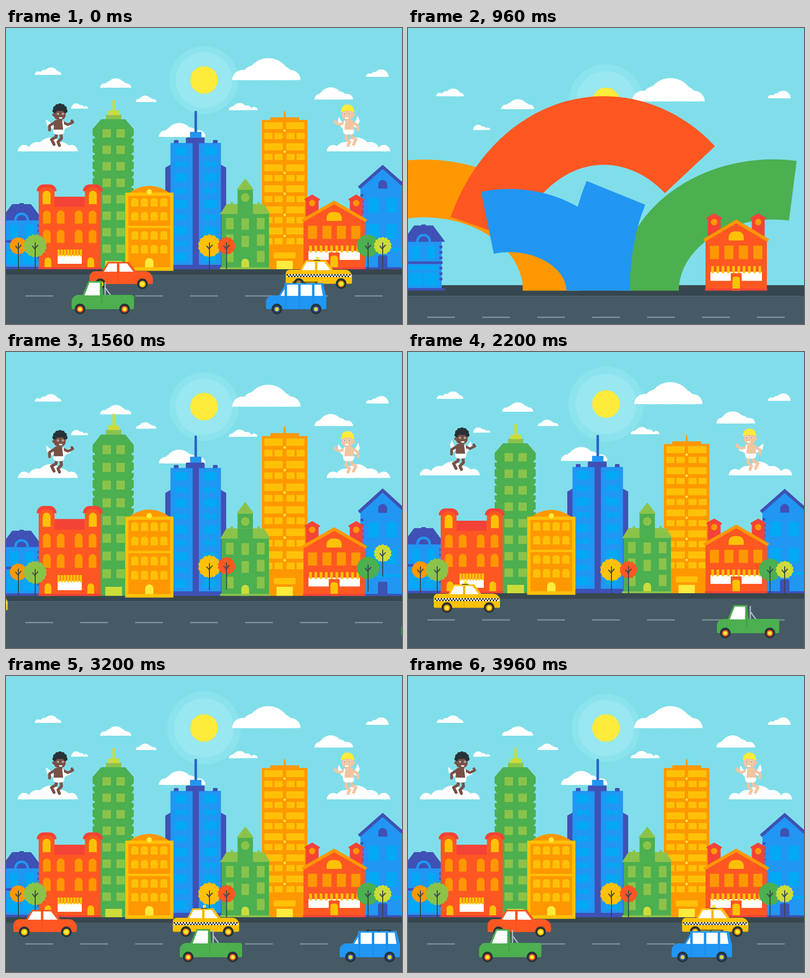
Animation of 800 by 600 pixels, one loop 4 s. Source, as an HTML page with a canvas:

```html
<!DOCTYPE html>
<html lang="en">
<head>
<meta charset="utf-8">
<title>City</title>
<style>
html, body { margin: 0; width: 100%; height: 100%; overflow: hidden; background: #80deea; }
canvas { display: block; }
</style>
</head>
<body>
<canvas id="stage" width="800" height="600"></canvas>
<script>
const g = document.getElementById('stage').getContext('2d');
const SKY = '#80deea', WHITE = '#fff', GREEN = '#4caf50', LEAF = '#8bc34a', LIME = '#cddc39',
  YELLOW = '#ffeb3b', AMBER = '#ffc107', ORANGE = '#ff9800', CORAL = '#ff5722', RED = '#f44336',
  BLUE = '#2196f3', INDIGO = '#3f51b5', AQUA = '#03a9f4', DARK = '#37474f', BLACK = '#263238';
const FLOOR = 489, LOOP = 4000, STEP = 40;
let now = 0;

// Drawing helpers
const rect = (c, x, y, w, h) => { g.fillStyle = c; g.fillRect(x, y, w, h); };
const round = (c, x, y, w, h, r) => { g.fillStyle = c; g.beginPath(); g.roundRect(x, y, w, h, r); g.fill(); };
const arched = (c, x, y, w, h, r = w / 2) => round(c, x, y, w, h, [r, r, 0, 0]);
const disc = (c, x, y, r) => { g.fillStyle = c; g.beginPath(); g.arc(x, y, r, 0, 7); g.fill(); };
const trace = points => { g.beginPath(); points.forEach(p => g.lineTo(...p)); };
const poly = (c, ...points) => { trace(points); g.fillStyle = c; g.fill(); };
const line = (c, w, ...points) => { trace(points); g.strokeStyle = c; g.lineWidth = w; g.stroke(); };
const repeat = (n, draw) => { for (let i = 0; i < n; i++) draw(i); };
// Symmetric shape from half widths and heights, listed downwards
const mirror = (c, cx, ...half) =>
  poly(c, ...half.map(([w, y]) => [cx + w, y]), ...half.reverse().map(([w, y]) => [cx - w, y]));
const block = (c, cx, y, w, h, r = 0) => arched(c, cx - w / 2, y, w, h, r);
const pair = (cx, gap, draw) => [cx - gap, cx + gap].forEach(draw);
// Rows of equal windows, centred on cx
const windows = (c, cx, y, [cols, rows], [dx, dy], [w, h], r = 0) =>
  repeat(rows, j => repeat(cols, i => block(c, cx + (i - (cols - 1) / 2) * dx, y + j * dy, w, h, r)));

// Timing helpers
const clamp = v => Math.min(1, Math.max(0, v));
const pop = (start, span) => {
  if (now <= start) return 0;
  const q = 1 - clamp((now - start) / span);
  return 1 + 1.7 * q * q - 2.7 * q ** 3;
};
const scaled = (x, y, sx, sy, draw) => {
  if (sy <= 0) return;
  g.save();
  g.translate(x, y); g.scale(sx, sy); g.translate(-x, -y);
  draw();
  g.restore();
};
const rise = (start, span, draw) => scaled(0, FLOOR, 1, pop(start, span), draw);
const cameraShift = () =>
  195 / (1 + (Math.max(0, now - 60) / 678) ** 4.42) * clamp(1 - (now / 2200) ** 8);

function sun() {
  const s = pop(80, 560), pulse = (1 - Math.cos((now - 500) / 1160 * 2 * Math.PI)) / 2;
  scaled(400, 105.4, s, s, () => {
    disc('#8be3ed', 400, 105.4, 69 + 7 * pulse);
    disc('#98e7f1', 400, 105.4, 57 + 4.5 * pulse);
    disc(YELLOW, 400, 105.4, 28);
  });
}

// A main half disc, with smaller ones between it and both ends
function cloud(start, left, right, base, height, peak) {
  const s = pop(start, 560), side = height * .46;
  const half = (x, r) => { g.beginPath(); g.arc(x, base, r, Math.PI, 0); g.fill(); };
  scaled((left + right) / 2, base, s, s, () => {
    g.fillStyle = WHITE;
    half(peak, height);
    [left + side, right - side].forEach(end => {
      half(end, side);
      half((peak + end) / 2, height * .68);
    });
  });
}

function sky() {
  sun();
  cloud(262, 727, 773, 99, 15, 758);
  cloud(313, 132, 166, 163.3, 10.5, 142);
  cloud(430, 450, 508, 166.5, 14.5, 472);
  cloud(495, 58, 112, 95, 15, 91);
  cloud(529, 190, 253, 121, 19, 222);
  cloud(540, 457, 595, 105.5, 44.5, 530);
  cloud(580, 262, 304, 150, 13, 281);
  cloud(620, 309, 403, 220.5, 28, 350);
  cloud(960, 623, 701, 144.8, 24.5, 656);
}

function road() {
  rect('#455a64', 0, 500, 800, 320);
  rect(DARK, 0, 478, 800, 22);
  repeat(7, i => rect('#78909c', 39 + 111 * i, 541.7, 56, 2.8));
}

// A ribbon that leaps from one x to another along half an ellipse
function leap(color, from, to, height, width, start) {
  const head = clamp((now - start) / 400), tail = clamp((now - start - 240) / 400);
  if (head <= tail) return;
  const right = to > from;
  const angle = p => Math.PI * (right ? 1 + p : 2 - p);
  g.strokeStyle = color;
  g.lineWidth = width;
  g.beginPath();
  g.ellipse((from + to) / 2, FLOOR, Math.abs(to - from) / 2, height, 0, angle(tail), angle(head), !right);
  g.stroke();
}

function ribbons() {
  leap(ORANGE, -225, 291, 207, 117, 542);
  leap(ORANGE, 290, 563, 255, 117, 920);
  leap(GREEN, 990, 486, 205, 122, 540);
  leap(GREEN, 486, 217, 255, 122, 920);
  leap(CORAL, 661, 131, 324.5, 139, 611);
  leap(BLUE, 26, 384, 142, 128, 552);
  leap(BLUE, 384, 761, 337, 128, 880);
}

function awning(cx, y, count, pitch, w) {
  windows(WHITE, cx, y + 11, [1, 1], [0, 0], [count * pitch - 2, 18]);
  repeat(count, i => round(AMBER, cx + (i - (count - 1) / 2) * pitch - w / 2, y, w, 14, [0, 0, w / 2, w / 2]));
}

function gable(body, trim, cx, peak, eave, half) {
  mirror(body, cx, [0, peak], [half, eave], [half, FLOOR]);
  line(trim, 6.5, [cx - half - 3, eave], [cx, peak], [cx + half + 3, eave]);
}

function blueCottage() {
  const cx = 31.5;
  block(BLUE, cx, 389, 73, 96);
  mirror(INDIGO, cx, [19, 357], [43.5, 390]);
  block(INDIGO, cx, 355, 9, 3);
  block(BLUE, cx, 374, 30, 16, 15);
  block(INDIGO, cx, 379, 20, 11, 10);
  windows(AQUA, cx, 399, [2, 1], [31, 0], [16.5, 26]);
  block(INDIGO, cx, 430, 77, 5);
  block(AQUA, cx, 438, 59, 9);
  windows(AQUA, cx, 453, [2, 1], [31, 0], [27, 26]);
  [398, 441].forEach(y => windows(INDIGO, cx, y, [2, 3], [70, 11], [6, 5]));
  block(INDIGO, cx, 484, 86, 5);
}

function greenTower() {
  const cx = 216.5;
  mirror(GREEN, cx, [24.5, 185], [41.5, 205], [37, 205], [37, FLOOR]);
  repeat(8, i => {
    const y = 204 + 33.4 * i;
    mirror(GREEN, cx, [41.5, y], [41.5, y + 14], [37, y + 17]);
    mirror(GREEN, cx, [41.5, y + 20], [41.5, y + 27], [37, y + 33.4]);
  });
  block(LEAF, cx + 1, 176, 31, 9);
  block(LIME, cx + 1, 167.5, 22, 9);
  block(LIME, cx + 1, 146, 5, 22);
  windows(LEAF, cx + 1, 205, [2, 8], [28, 33.4], [17, 17]);
  block(LIME, cx + 1, 472, 34, 17);
}

function redHall() {
  const cx = 128.7;
  block(CORAL, cx, 361, 125, 128);
  block(RED, cx, 342, 62, 20.5);
  pair(cx, 46.7, x => {
    block(CORAL, x, 331, 32, 40);
    block(RED, x, 317, 40, 14, 15);
    block(CORAL, x, 323, 28, 14, 12);
    block(AMBER, x, 330, 16, 27, 8);
    windows(ORANGE, x + (x < cx ? 14.5 : -14.5), 370, [2, 2], [28, 39], [15.5, 26.5], 7.7);
  });
  awning(cx, 449, 8, 6.35, 5);
  windows(AMBER, cx - .7, 465, [2, 1], [86.5, 0], [13.5, 24], 6.7);
  block(RED, cx, 485, 127, 4);
}

function orangeFront() {
  const cx = 289.5;
  g.beginPath();
  g.moveTo(cx - 46, 338);
  g.quadraticCurveTo(cx, 302, cx + 46, 338);
  g.fillStyle = ORANGE; g.fill();
  block(ORANGE, cx, 337, 91, 152);
  g.strokeStyle = AMBER; g.lineWidth = 6.5; g.lineCap = 'round'; g.stroke(); g.lineCap = 'butt';
  disc(YELLOW, cx, 332, 5.2);
  [345, 412].forEach(y => windows(AMBER, cx, y, [4, 2], [19.6, 28], [14.5, 17], 5));
  block(AMBER, cx, 401, 93, 4.5);
  block(YELLOW, cx, 466.5, 17, 22.5, 8.5);
  block(AMBER, cx, 485, 93, 4);
}

function blueTower() {
  const cx = 383.3;
  mirror(INDIGO, cx, [51, 277], [61.5, 283], [61.5, FLOOR]);
  block(BLUE, cx, 233, 102, 247);
  block(INDIGO, cx, 233, 12.5, 256);
  windows(INDIGO, cx, 227, [2, 1], [79, 0], [9.5, 6.5], 2);
  block(INDIGO, cx - 1, 222, 38, 11.5, 3);
  block(BLUE, cx, 210.5, 23, 12);
  block('#2962c8', cx, 168, 5, 43, 2);
  windows(AQUA, cx, 241, [2, 5], [59.5, 53.7], [25.5, 17]);
  pair(cx, 29.7, x => windows(AQUA, x, 271, [2, 4], [14, 53.5], [11, 11]));
}

function greenHall() {
  const cx = 483.3;
  block(GREEN, cx, 328, 31, 60);
  mirror(LEAF, cx, [0, 305], [17.5, 328]);
  disc(LEAF, cx, 343.5, 8.7);
  mirror(LEAF, cx, [38, 357], [51, 377.5]);
  block(GREEN, cx, 357, 31, 25);
  block(GREEN, cx, 377, 96, 112);
  windows(LEAF, cx, 353, [2, 1], [54, 0], [5, 5]);
  windows(LEAF, cx, 385, [2, 3], [62.5, 33.3], [15.5, 23]);
  windows(LEAF, cx, 386, [1, 2], [0, 35], [15, 23]);
  block(LIME, cx, 467.5, 15.5, 21.5, 7.7);
  block(LEAF, cx, 485, 102, 4);
}

function orangeTower() {
  const cx = 563;
  block(ORANGE, cx, 186.5, 92, 302.5);
  block(ORANGE, cx, 181, 58, 6);
  mirror(ORANGE, cx, [1, 168], [2, 181]);
  windows(AMBER, cx - .5, 191, [2, 6], [44, 42.7], [37, 14]);
  pair(cx - .3, 22.3, x => windows(AMBER, x, 212.5, [2, 6], [20.5, 42.7], [16.5, 12.5]));
  repeat(6, i => disc(YELLOW, cx, 208 + 42.7 * i, 2.5));
  block(AMBER, cx, 455, 44, 12);
  block(YELLOW, cx, 472, 33, 17);
}

function blueHouse() {
  const cx = 761;
  gable(BLUE, INDIGO, cx, 281.5, 324, 45);
  block(INDIGO, cx, 308, 18, 17.5, 9);
  windows(AQUA, cx, 344, [2, 2], [36, 53], [21, 30]);
  windows(INDIGO, cx, 337, [2, 4], [84, 11], [6, 5]);
  block(AQUA, cx, 446, 76, 6);
  block(INDIGO, cx, 461, 19, 28, 4);
  block(INDIGO, cx, 485, 100, 4);
}

function redHouse() {
  const cx = 663;
  pair(cx, 44.5, x => {
    block(RED, x, 345, 26, 45);
    mirror(RED, x, [0, 337.5], [16, 347], [14, 350]);
    disc(ORANGE, x, 355, 6.5);
  });
  gable(CORAL, ORANGE, cx, 353.5, 391, 62);
  block(AMBER, cx, 373, 30.5, 18, 12);
  windows(ORANGE, cx, 401, [4, 1], [29.2, 0], [18.3, 26.5]);
  awning(cx, 441, 10, 10.6, 5.5);
  block(CORAL, cx, 455, 22, 34);
  block(AMBER, cx, 461.5, 15, 27.5, 5);
  block(RED, cx, 485, 126, 4);
}

function buildings() {
  rise(530, 420, blueCottage);
  rise(1231, 700, greenTower);
  rise(1238, 700, orangeTower);
  rise(1280, 700, blueHouse);
  rise(980, 640, blueTower);
  rise(1028, 700, redHall);
  rise(979, 700, orangeFront);
  rise(979, 700, greenHall);
  rise(495, 560, redHouse);
}

function tree(color, x, r, start, lobes) {
  if (now <= start) return;
  const lift = 400 * (1 - clamp((now - start) / 500)) ** 3;
  g.save();
  g.translate(x, 441.5 - lift);
  g.fillStyle = color;
  g.beginPath();
  repeat(120, i => {
    const a = i / 60 * Math.PI, d = lobes ? r - 2 + 2 * Math.abs(Math.sin(a * lobes / 2)) : r;
    g.lineTo(d * Math.cos(a), d * Math.sin(a));
  });
  g.fill();
  line(DARK, 2, [0, -7], [0, FLOOR - 441.5]);
  line(DARK, 2, [-6, 0], [0, 7]);
  line(DARK, 2, [6, -2], [0, 5]);
  g.restore();
}

function trees() {
  tree(ORANGE, 25, 17, 1125, 0);
  tree(LEAF, 59, 23.3, 1060, 16);
  tree(AMBER, 411, 23, 1215, 14);
  tree(CORAL, 445.5, 18, 1220, 14);
  tree(GREEN, 731.5, 22.5, 1200, 0);
  tree(LIME, 761, 18, 1290, 14);
}

function wing(x, side, angle) {
  g.save();
  g.translate(x, 197); g.scale(side, 1); g.rotate(angle);
  poly(WHITE, [0, 2], [14, -16], [15, -4], [5, 7]);
  g.restore();
}

// Drawn around the middle of the head, feet on y = 240
function cherub(skin, hair, curly, phase) {
  const flap = .25 * Math.cos(now / 400 * 2 * Math.PI + phase);
  g.lineJoin = g.lineCap = 'round';
  wing(-10, -1, flap);
  wing(6, 1, flap + .2);
  line(skin, 6, [-6, 214], [-7, 221], [-16, 226], [-11, 236]);
  line(skin, 6, [3, 214], [4, 224], [-3, 231], [0, 238]);
  line(skin, 5.5, [-9, 191], [-20, 198], [-20, 207]);
  line(skin, 5, [7, 191], [17, 196], [27, 191], [25, 188]);
  block(skin, -1, 186, 21, 26, 6);
  round(WHITE, -12.5, 206, 22.5, 10, [0, 0, 7, 7]);
  line(WHITE, 3, [7, 189], [9, 206]);
  round(skin, -11.5, 162, 24, 24, 9);
  disc(skin, -11.5, 176, 3);
  block(hair, 1, 156, 24, 12, 9);
  repeat(7, i => {
    const a = Math.PI * (1 + i / 6);
    disc(hair, 1 + 11 * Math.cos(a), 168 + 11 * Math.sin(a), curly ? 4.3 : 2.5);
  });
  pair(2, 5, x => { disc(WHITE, x, 174, 2); disc(BLACK, x, 174, 1); });
  round(WHITE, -1, 181, 7, 3, [0, 0, 3, 3]);
  g.lineJoin = 'miter';
  g.lineCap = 'butt';
}

function cherubs() {
  cloud(965, 24, 145, 250, 28, 90);
  cloud(965, 648, 776, 250, 28, 709);
  const s = pop(1000, 520);
  const place = (x, side, ...look) => scaled(x, 240, s * side, s, () => { g.translate(x, 0); cherub(...look); });
  place(108, 1, '#795046', BLACK, true, 0);
  place(691, -1, '#f2c5a0', YELLOW, false, Math.PI);
}

// Rounded body, tapered cabin and glass split by pillars
function vehicle({ color, width, floor, belt, roof, base, top, corners, pillars, wheels, ring, hub }) {
  round(color, 0, belt, width, floor - belt, [...corners, 3, 3]);
  const cabin = (c, inset, low) =>
    poly(c, [base[0] + inset * 1.3, low], [top[0] + inset / 2, roof + inset * .8],
      [top[1] - inset, roof + inset * .8], [base[1] - inset * 1.8, low]);
  g.lineJoin = 'round';
  cabin(color, 0, belt + 3);
  line(color, 3, [top[0] + 1, roof + 1.5], [top[1] - 1, roof + 1.5]);
  cabin(WHITE, 4, belt + 1);
  pillars.forEach(x => {
    rect(color, x - 2.5, roof, 5, belt - roof + 3);
    rect('rgba(0,0,0,.13)', x - .5, roof + 4, 1, floor - roof - 5);
  });
  wheels.forEach(x => {
    disc(BLACK, x, floor - .5, 10.7);
    disc(ring, x, floor, 6.6);
    disc(hub, x, floor, 4);
  });
}

function redCar() {
  vehicle({ color: CORAL, width: 128, floor: 519, belt: 493, roof: 474, base: [24, 96], top: [37, 80],
    corners: [12, 16], pillars: [58], wheels: [22, 107], ring: AMBER, hub: YELLOW });
}

function taxi() {
  vehicle({ color: AMBER, width: 134, floor: 518.5, belt: 490, roof: 471, base: [28, 98], top: [40, 82],
    corners: [8, 14], pillars: [61.5], wheels: [26.5, 112], ring: ORANGE, hub: YELLOW });
  rect(WHITE, 2, 499, 130, 6);
  repeat(43, i => rect(BLACK, 2 + 3 * i, i % 2 ? 502 : 499, 3, 3));
  rect(BLACK, 57, 470, 13, 1.5);
  arched(YELLOW, 61, 464, 6, 6, 2);
}

function truck() {
  line('#b0bec5', 2.5, [67.5, 515], [67.5, 541]);
  line('#b0bec5', 2.5, [68, 527], [79, 542]);
  vehicle({ color: GREEN, width: 126, floor: 570, belt: 541, roof: 513, base: [21, 64], top: [34, 61],
    corners: [14, 5], pillars: [], wheels: [17, 107], ring: CORAL, hub: YELLOW });
  rect('#388e3c', 60, 517, 1, 45);
}

function wagon() {
  vehicle({ color: BLUE, width: 122, floor: 570, belt: 542, roof: 517, base: [24, 122], top: [41, 115],
    corners: [14, 4], pillars: [40, 67.5, 95.5], wheels: [22, 101], ring: INDIGO, hub: LIME });
  rect(BLACK, 53, 514.5, 52, 1.5);
  windows(BLACK, 79, 515, [3, 1], [22, 0], [2, 3]);
}

function drive(car, x, speed) {
  g.save();
  g.translate(x + speed * (now - 3200), 0);
  car();
  g.restore();
}

function traffic() {
  drive(redCar, 15, .192);
  drive(taxi, 337, .285);
  drive(truck, 351, -.273);
  drive(wagon, 674, -.186);
}

function frame(clock) {
  // The loop opens on its finished city, then cuts to an empty sky.
  now = Math.floor((clock % LOOP) / STEP) * STEP || LOOP;
  g.setTransform(1, 0, 0, 1, 0, 0);
  rect(SKY, 0, 0, 800, 600);
  g.translate(0, cameraShift());
  [sky, road, ribbons, buildings, trees, cherubs, traffic].forEach(draw => draw());
}

const begin = performance.now();
function tick() {
  frame(performance.now() - begin);
  requestAnimationFrame(tick);
}
tick();
</script>
</body>
</html>
```
